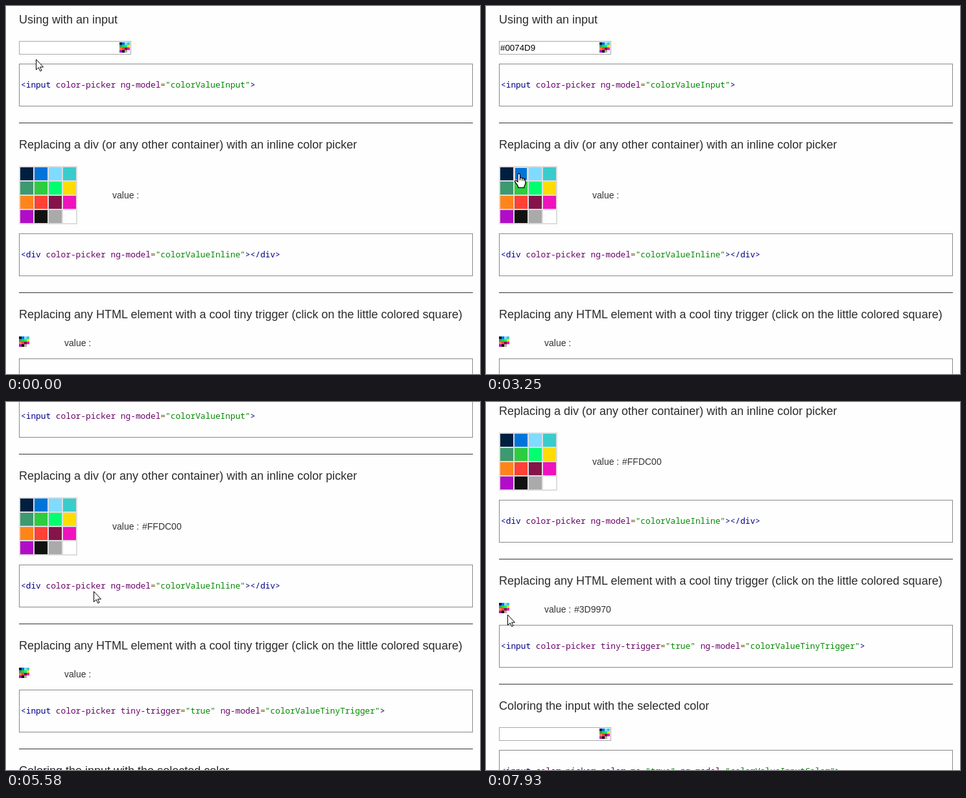
An HTML page for the animation above (8000 ms loop, 731 by 568 pixels).

```html
<!DOCTYPE html>
<html lang="en">
<head>
<meta charset="utf-8">
<title>Color picker demo</title>
<style>
  html, body { margin: 0; width: 100%; height: 100%; overflow: hidden; background: #fefefe; }
  svg { display: block; }
  text { font-family: "Liberation Sans", Arial, sans-serif; font-size: 14px; fill: #333; white-space: pre; }
  .title { font-size: 18px; fill: #2b2b2b; }
  .field { font-size: 13.33px; fill: #000; }
  .code { font-family: "Noto Sans Mono", monospace; font-size: 12.82px; }
  .tag { fill: #008; }
  .attr { fill: #606; }
  .str { fill: #080; }
  .op { fill: #660; }
  rect { shape-rendering: crispEdges; }
  .box { fill: #fefefe; stroke: #888; }
  .input { fill: #fff; stroke: #a9a9a9; }
  .rule { fill: #333; }
  .focus { fill: none; stroke: #6a9bdf; stroke-width: 2; shape-rendering: auto; }
  .hover { fill: none; stroke: #ddd; }
  .pointer { fill: #fff; stroke: #000; stroke-linejoin: round; }
</style>
</head>
<body>
<svg id="stage" width="731" height="568" viewBox="0 0 731 568">
  <defs>
    <g id="icon"></g>
    <g id="grid"><rect width="90" height="90" fill="#ddd"/></g>
  </defs>
  <g id="page">
    <g id="static"></g>
    <text id="field" class="field" x="22" y="69"></text>
    <text id="inlineValue" x="210" y="297"></text>
    <text id="tinyValue" x="136" y="525"></text>
    <rect id="focus" class="focus" x="20" y="54" width="173" height="21" rx="1"/>
    <rect id="caret" x="22" y="57" width="1" height="15"/>
    <use id="inputPopup" href="#grid" x="20" y="75"/>
    <use id="tinyPopup" href="#grid" x="20" y="526"/>
    <rect id="hover" class="hover" width="19" height="19"/>
  </g>
  <g id="cursor">
    <path id="arrow" class="pointer" d="M.5,.5V16.5L4.2,13L6.7,18.5L9,17.5L6.6,12.2H11.5Z"/>
    <path id="beam" fill="none" stroke="#000" d="M-3,.5H-1L.5,1.5L2,.5H4M.5,1.5V14.5M-3,15.5H-1L.5,14.5L2,15.5H4"/>
    <path id="hand" class="pointer" stroke-width="1.2" d="M-2,1.8Q-.3,-.6 1.5,1.8V7.5Q3.6,6 4.8,8Q6.5,7 7.7,9Q9.8,8.6 9.8,11V16Q9.5,18 8,20V22.3H-1.5V20.5Q-3,17.5 -6.3,13.5Q-6.8,11 -4.2,11.5L-2,13.5ZM1.5,7.5V11M4.8,8V11.5M7.7,9V12"/>
  </g>
</svg>
<script>
const LOOP = 8000;
const $ = id => document.getElementById(id);
const colors = ['#001f3f', '#0074d9', '#7fdbff', '#39cccc', '#3d9970', '#2ecc40', '#01ff70', '#ffdc00',
  '#ff851b', '#ff4136', '#85144b', '#f012be', '#b10dc9', '#111', '#aaa', '#fff'];

const cells = (size, pitch, pad) => colors.map((c, i) =>
  `<rect x="${pad + i % 4 * pitch}" y="${pad + (i >> 2) * pitch}" width="${size}" height="${size}" fill="${c}"/>`).join('');
$('icon').innerHTML = cells(4, 4, 0);
$('grid').innerHTML += cells(20, 22, 2);

const escape = s => s.replace(/</g, '&lt;').replace(/>/g, '&gt;');
const paint = src => src.replace(/("[^"]*")|(=)|(<\/?\w+>?|>)|([\w-]+)/g, (s, str, op, tag) =>
  `<tspan class="${str ? 'str' : op ? 'op' : tag ? 'tag' : 'attr'}">${escape(s)}</tspan>`);

const title = (y, s) => `<text class="title" x="20" y="${y}">${s}</text>`;
const label = (x, y) => `<text x="${x}" y="${y}">value :</text>`;
const rule = y => `<rect class="rule" x="20" y="${y}" width="700" height="1"/>`;
const icon = (x, y) => `<use href="#icon" x="${x}" y="${y}"/>`;
const input = y => `<rect class="input" x="20.5" y="${y + .5}" width="172" height="20"/>` + icon(175, y + 2);
const code = (y, src) => `<rect class="box" x="20.5" y="${y + .5}" width="699" height="65"/>` +
  `<text class="code" x="23" y="${y + 37}">${paint(src)}</text>`;

$('static').innerHTML = [
  title(27, 'Using with an input'),
  input(54),
  code(89, '<input color-picker ng-model="colorValueInput">'),
  rule(180),
  title(220, 'Replacing a div (or any other container) with an inline color picker'),
  '<use href="#grid" x="20" y="247"/>',
  label(164, 297),
  code(351, '<div color-picker ng-model="colorValueInline"></div>'),
  rule(442),
  title(482, 'Replacing any HTML element with a cool tiny trigger (click on the little colored square)'),
  icon(20, 510),
  label(90, 525),
  code(544, '<input color-picker tiny-trigger="true" ng-model="colorValueTinyTrigger">'),
  rule(635),
  title(675, 'Coloring the input with the selected color'),
  input(702),
  code(737, '<input color-picker color-me="true" ng-model="colorValueInputColor">')
].join('');

// Pointer: time, shape, x, y
const moves = [
  [0, 'arrow', 46, 82], [160, 'arrow', 44, 76], [280, 'beam', 43, 63],
  [420, 'beam', 43, 59], [540, 'beam', 43, 56], [670, 'beam', 42, 54], [790, 'beam', 42, 52],
  [1480, 'beam', 46, 57], [1610, 'beam', 56, 67], [1760, 'hand', 56, 83],
  [2030, 'arrow', 55, 83], [2460, 'beam', 69, 92], [2590, 'beam', 63, 118], [2710, 'beam', 58, 141],
  [2860, 'beam', 60, 201], [3010, 'arrow', 56, 230], [3130, 'hand', 53, 250], [3250, 'hand', 51, 258],
  [3560, 'hand', 71, 258], [3960, 'hand', 73, 266], [4080, 'hand', 76, 278],
  [4230, 'hand', 88, 285], [4350, 'hand', 95, 288], [4620, 'hand', 97, 287],
  [4770, 'hand', 104, 286], [4920, 'arrow', 131, 287], [5070, 'arrow', 132, 288], [5190, 'arrow', 132, 289],
  [5340, 'arrow', 135, 292], [5980, 'arrow', 130, 294], [6100, 'arrow', 115, 297],
  [6250, 'arrow', 72, 306], [6370, 'arrow', 44, 313], [6490, 'hand', 32, 314],
  [7220, 'hand', 32, 317], [7380, 'hand', 36, 342], [7500, 'hand', 38, 354], [7650, 'hand', 37, 353],
  [7800, 'arrow', 36, 344], [7930, 'arrow', 33, 328]
];
const scrolls = [[0, 0], [5580, 100], [5860, 200]];
const inlineValues = [[0, ''], [3840, '#7FDBFF'], [4500, '#FFDC00']];

const at = (list, t) => list.findLast(step => step[0] <= t);
const show = (id, on) => $(id).setAttribute('visibility', on ? 'visible' : 'hidden');
const write = (id, s) => { if ($(id).textContent !== s) $(id).textContent = s; };
const within = (t, a, b) => t >= a && t < b;

function hoverCell(x, y, top) {
  const col = Math.floor((x - 21) / 22), row = Math.floor((y - top - 1) / 22);
  const on = col >= 0 && col < 4 && row >= 0 && row < 4;
  if (on) {
    $('hover').setAttribute('x', 22.5 + col * 22);
    $('hover').setAttribute('y', top + 2.5 + row * 22);
  }
  return on;
}

function draw(now) {
  const t = now % LOOP;
  const [, shape, x, y] = at(moves, t);
  const scroll = at(scrolls, t)[1];
  const inputOpen = within(t, 930, 2030), tinyOpen = within(t, 6790, 7800);

  $('page').setAttribute('transform', `translate(0 ${-scroll})`);
  $('cursor').setAttribute('transform', `translate(${x} ${y})`);
  for (const id of ['arrow', 'beam', 'hand']) show(id, id === shape);

  show('focus', inputOpen);
  show('inputPopup', inputOpen);
  show('tinyPopup', tinyOpen);
  show('caret', within(t, 930, 1480) || within(t, 1900, 2030));
  const top = inputOpen ? 75 : tinyOpen ? 526 : 247;
  show('hover', shape === 'hand' && hoverCell(x, y + scroll, top));

  write('field', t < 2030 ? '' : '#0074D9');
  write('inlineValue', at(inlineValues, t)[1]);
  write('tinyValue', t < 7800 ? '' : '#3D9970');
}

const start = performance.now();
function tick() {
  draw(performance.now() - start);
  requestAnimationFrame(tick);
}
tick();
</script>
</body>
</html>
```
